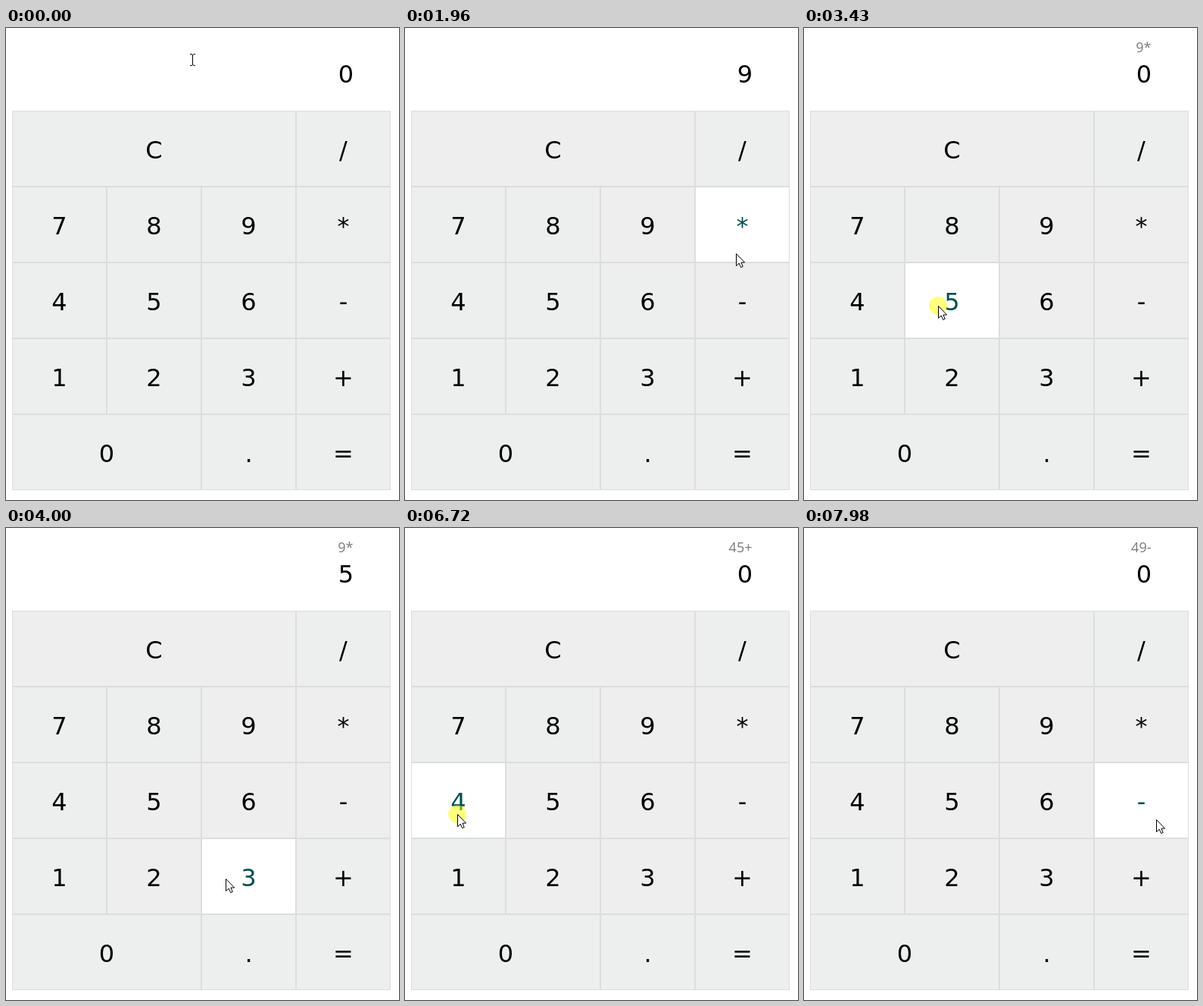
Recreate the animation shown at these times as an HTML page. Size 519x622 px, loop 8 s.

```html
<!DOCTYPE html>
<html lang="en">
<head>
<meta charset="utf-8">
<title>Calculator</title>
<style>
  html, body { margin: 0; width: 100%; height: 100%; overflow: hidden; background: #fff; }
  svg { display: block; width: 519px; height: 622px; }
  text { font: 32px "DejaVu Sans", sans-serif; text-anchor: middle; }
  #expr { font: 18px "Open Sans", sans-serif; text-anchor: end; fill: #7a7a7a; }
  .key rect { fill: #ecefee; stroke: #ddd; }
  .key.used rect { fill: #eee; }
  .key.hover rect { fill: #fff; }
  .key.hover text { fill: #005050; }
</style>
</head>
<body>
<svg viewBox="0 0 519 622">
  <text id="expr" x="458.5" y="32"></text>
  <text id="value" x="449" y="72"></text>
  <g id="keys"></g>
  <circle id="press" r="12" fill="#ff0" fill-opacity=".5"/>
  <path id="arrow" d="M.5 .5V16.5L4.2 13L6.6 18.5L9.2 17.4L6.9 12H11.6Z" fill="#fff" stroke="#000"/>
  <path id="beam" d="M-3 -7.5H-1L.5 -6.5L2 -7.5H4M.5 -6.5V6.5M-3 7.5H-1L.5 6.5L2 7.5H4" fill="none" stroke="#000"/>
</svg>
<script>
const LOOP = 8000, STEP = 76.5;
const LEFT = 8, TOP = 109, KEY_W = 125, KEY_H = 100;
const $ = id => document.getElementById(id);

// A space widens the key before it
const keys = ['C  /', '789*', '456-', '123+', '0 .='].flatMap((line, row) =>
  [...line.matchAll(/\S */g)].map(({ 0: cell, index }) => {
    const x = LEFT + index * KEY_W, y = TOP + row * KEY_H, w = cell.length * KEY_W;
    $('keys').insertAdjacentHTML('beforeend',
      `<g class="key"><rect x="${x + .5}" y="${y + .5}" width="${w - 1}" height="${KEY_H - 1}"/>
       <text x="${x + w / 2}" y="${y + 63}">${cell[0]}</text></g>`);
    const holds = p => p.x >= x && p.x < x + w && p.y >= y && p.y < y + KEY_H;
    return { el: $('keys').lastElementChild, holds };
  }));

// Each move slows down along a curve; without a bend it is straight
const moves = [
  { at: 710, steps: 9, to: [307, 260], bend: [269, 222] },
  { at: 1650, steps: 9, to: [449, 263], bend: [430, 370] },
  { at: 2820, steps: 5, to: [177, 366], bend: [504, 254] },
  { at: 3830, steps: 8, to: [440, 481], bend: [210, 478] },
  { at: 5290, steps: 1, to: [425, 480] },
  { at: 5370, steps: 2, to: [58, 384] },
  { at: 5610, steps: 2, to: [102, 384] },
  { at: 5840, steps: 4, to: [69, 377] },
  { at: 6930, steps: 8, to: [465, 384] }
];

const trail = [{ t: 0, x: 246, y: 42 }];
for (const { at, steps, to, bend } of moves) {
  const { x, y } = trail[trail.length - 1];
  const from = [x, y];
  for (let k = 0; k < steps; k++) {
    const e = 1 - (1 - (k + 1) / steps) ** 2;
    const [px, py] = from.map((a, i) => {
      const mid = bend ? bend[i] : (a + to[i]) / 2;
      return Math.round((1 - e) ** 2 * a + 2 * e * (1 - e) * mid + e * e * to[i]);
    });
    trail.push({ t: at + k * STEP, x: px, y: py });
  }
}

// The spot shows from down to up; the key takes effect at "acts"
const clicks = [
  { key: '9', down: 1480, acts: 1480, up: 1650 },
  { key: '*', down: 2410, acts: 2410, up: 2820 },
  { key: '5', down: 3430, acts: 3600, up: 3600 },
  { key: '+', down: 4630, acts: 4710, up: 4810 },
  { key: '4', down: 6720, acts: 6850, up: 6850 },
  { key: '-', down: 7810, acts: 7980, up: 7980 }
];

function calculate(pressed) {
  let total = 0, op = '+', expr = '', value = 0;
  for (const key of pressed) {
    if (/\d/.test(key)) {
      value = +key;
    } else {
      total = op === '*' ? total * value : total + value;
      op = key;
      expr = total + op;
      value = 0;
    }
  }
  return { expr, value };
}

const show = (id, on) => $(id).setAttribute('visibility', on ? 'visible' : 'hidden');

function draw(t) {
  const past = trail.filter(p => p.t <= t);
  const pos = past[past.length - 1];
  for (const { el, holds } of keys) {
    el.classList.toggle('used', past.some(holds));
    el.classList.toggle('hover', holds(pos));
  }
  for (const id of ['press', 'arrow', 'beam'])
    $(id).setAttribute('transform', `translate(${pos.x} ${pos.y})`);
  show('press', clicks.some(c => t >= c.down && t < c.up));
  show('arrow', pos.y >= TOP);
  show('beam', pos.y < TOP);

  const { expr, value } = calculate(clicks.filter(c => c.acts <= t).map(c => c.key));
  $('expr').textContent = expr;
  $('value').textContent = value;
}

let origin;
function tick(now) {
  origin ??= now;
  draw((now - origin) % LOOP);
  requestAnimationFrame(tick);
}
draw(0);
requestAnimationFrame(tick);
</script>
</body>
</html>
```
